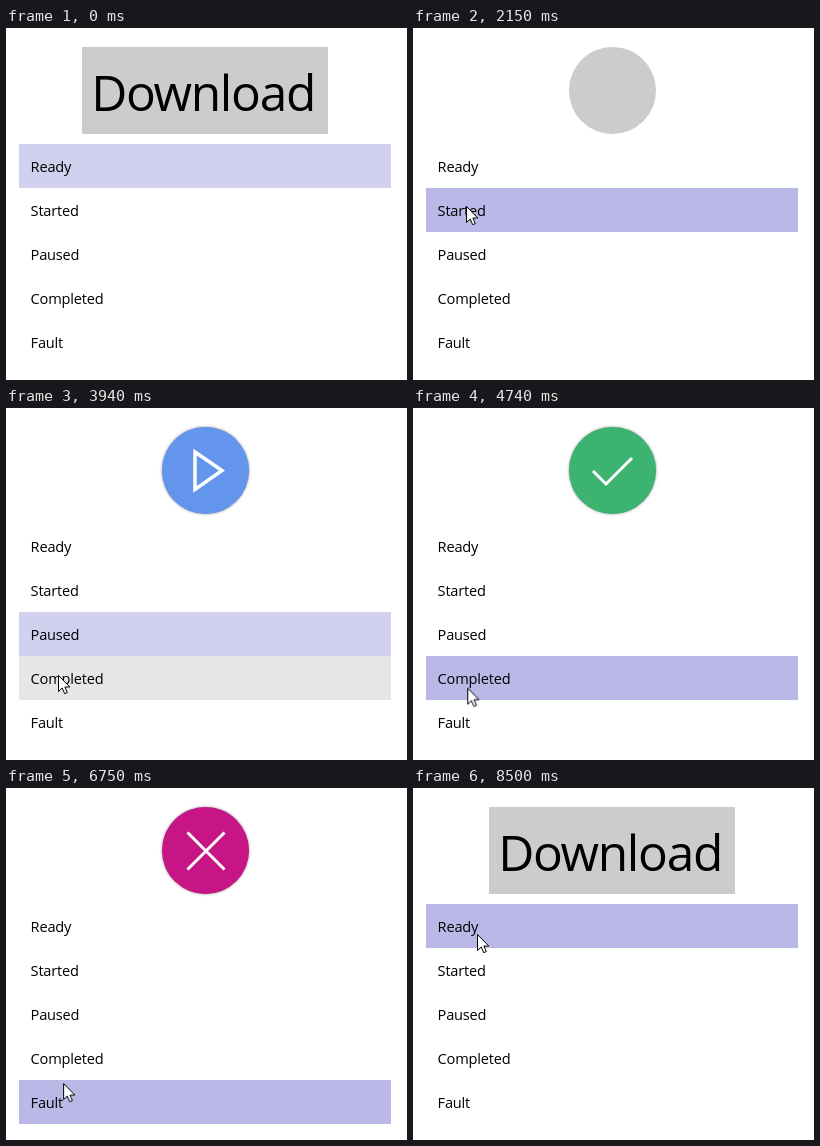
Write an HTML page that moves like this. It is 401 px wide and 352 px high and loops after 9400 ms.

```html
<!DOCTYPE html>
<html lang="en">
<head>
<meta charset="utf-8">
<title>Download button states</title>
<style>
  html, body { margin: 0; width: 100%; height: 100%; overflow: hidden; background: #fff; }
  svg { display: block; width: 401px; height: 352px; }
  svg * { animation: 9.4s linear infinite; }
  :root { --sel: #d1d0ee; --selHover: #bab8e6; --hover: #e6e6e6; --press: #ccc; }
  text { font-family: "Open Sans", "Noto Sans", sans-serif; }
  .label { font-size: 14.6px; letter-spacing: -.2px; }
  .caption { font-size: 49.5px; letter-spacing: -1.3px; animation-name: caption; }
  .glyph { fill: none; stroke: #fff; }
  .shadow { filter: drop-shadow(0 0 1.5px rgba(0, 0, 0, .4)); }

  /* list rows */
  .row { fill: transparent; animation-timing-function: step-end; }
  .ready { animation-name: ready; }
  .started { animation-name: started; }
  .paused { animation-name: paused; }
  .completed { animation-name: completed; }
  .fault { animation-name: fault; }
  @keyframes ready {
    0% { fill: var(--sel); }
    5.94% { fill: var(--selHover); }
    7.98% { fill: var(--sel); }
    16.48% { fill: transparent; }
    74.99% { fill: var(--hover); }
    78.7% { fill: var(--press); }
    79.04%, 100% { fill: var(--selHover); }
  }
  @keyframes started {
    0% { fill: transparent; }
    7.98% { fill: var(--hover); }
    14.98% { fill: var(--press); }
    16.48% { fill: var(--selHover); }
    26.7% { fill: var(--sel); }
    38.8% { fill: transparent; }
    73.96% { fill: var(--hover); }
    74.99%, 100% { fill: transparent; }
  }
  @keyframes paused {
    0% { fill: transparent; }
    26.7% { fill: var(--hover); }
    38.18% { fill: var(--press); }
    38.8% { fill: var(--selHover); }
    40.4% { fill: var(--sel); }
    43.6% { fill: transparent; }
    72.93% { fill: var(--hover); }
    73.96%, 100% { fill: transparent; }
  }
  @keyframes completed {
    0% { fill: transparent; }
    40.4% { fill: var(--hover); }
    42.97% { fill: var(--press); }
    43.6% { fill: var(--selHover); }
    54.82% { fill: var(--sel); }
    62.86% { fill: transparent; }
    71.88% { fill: var(--hover); }
    72.93%, 100% { fill: transparent; }
  }
  @keyframes fault {
    0% { fill: transparent; }
    54.82% { fill: var(--hover); }
    60.52% { fill: var(--press); }
    62.86% { fill: var(--selHover); }
    71.88% { fill: var(--sel); }
    79.04%, 100% { fill: transparent; }
  }
  .nudge { animation-name: nudge; animation-timing-function: step-end; }
  @keyframes nudge {
    0%, 63.82%, 100% { transform: none; }
    60.52% { transform: translateX(1px); }
  }

  /* button */
  .shape { fill: #ccc; animation-name: shape; }
  @keyframes shape {
    0%, 100% { x: 76px; width: 246px; rx: 0px; }
    16.48% { x: 76px; width: 246px; rx: 0px; animation-timing-function: ease-in-out; }
    22.83% { x: 156px; width: 87px; rx: 43.5px; }
    80% { x: 156px; width: 87px; rx: 43.5px; animation-timing-function: ease-in-out; }
    87.34% { x: 76px; width: 246px; rx: 0px; }
  }
  @keyframes caption {
    0%, 16.48% { opacity: 1; }
    17%, 89.36% { opacity: 0; }
    90.35%, 100% { opacity: 1; }
  }
  .ring { fill: none; stroke: #6495ed; stroke-width: 3; stroke-dasharray: 1; animation-name: ring; }
  @keyframes ring {
    0%, 23.5% { stroke-dashoffset: 1; opacity: 0; }
    23.51% { stroke-dashoffset: 1; opacity: 1; }
    27.02%, 38.8% { stroke-dashoffset: 0; opacity: 1; }
    38.81%, 100% { stroke-dashoffset: 0; opacity: 0; }
  }
  .play { animation-name: play; }
  .done { animation-name: done; }
  .error { animation-name: error; }
  @keyframes play {
    0%, 38.8% { opacity: 0; }
    41.6%, 43.6% { opacity: 1; }
    43.61%, 100% { opacity: 0; }
  }
  @keyframes done {
    0%, 44.57% { opacity: 0; }
    48.08%, 62.85% { opacity: 1; }
    62.86%, 100% { opacity: 0; }
  }
  @keyframes error {
    0%, 63.83% { opacity: 0; }
    67.34%, 79.03% { opacity: 1; }
    79.04%, 100% { opacity: 0; }
  }

  /* pointer */
  .pointer { animation-name: move; }
  .arrow { fill: #fff; stroke: #000; animation-name: appear; animation-timing-function: step-end; }
  .tap { fill: rgba(70, 115, 224, .7); animation-name: tap; animation-timing-function: step-end; }
  @keyframes move {
    0%, 5% { transform: translate(4px, 135px); }
    10.1%, 16.48% { transform: translate(53px, 177px); }
    18%, 23.94% { transform: translate(53px, 178px); }
    26.49% { transform: translate(53px, 202px); }
    29.79% { transform: translate(52px, 222px); }
    34.26%, 39.15% { transform: translate(52px, 225px); }
    41.49%, 48.3% { transform: translate(52px, 267px); }
    51.17%, 54.15% { transform: translate(55px, 284px); }
    57.02%, 71.28% { transform: translate(56px, 318px); }
    75.32%, 100% { transform: translate(64px, 146px); }
  }
  @keyframes appear {
    0% { opacity: 0; }
    5%, 100% { opacity: 1; }
  }
  @keyframes tap {
    0%, 16.48%, 38.8%, 43.6%, 62.86%, 79.04%, 100% { opacity: 0; }
    14.98%, 38.18%, 42.97%, 60.52%, 78.7% { opacity: 1; }
  }
</style>
</head>
<body>
<svg viewBox="0 0 401 352">
  <rect class="shape" x="76" y="19" width="246" height="87"/>
  <text class="caption" x="85.2" y="83">Download</text>

  <circle class="ring" cx="199.5" cy="62.5" r="42" pathLength="1" transform="rotate(-90 199.5 62.5)"/>
  <g class="play">
    <circle class="shadow" cx="199.5" cy="62.5" r="43.5" fill="#6495ed"/>
    <path class="glyph" stroke-width="3.5" d="M189 44L216 62.5L189 81.5Z"/>
  </g>
  <g class="done">
    <circle class="shadow" cx="199.5" cy="62.5" r="43.5" fill="#3cb371"/>
    <path class="glyph" stroke-width="3" d="M180 63L193 76L219 50"/>
  </g>
  <g class="error">
    <circle class="shadow" cx="199.5" cy="62.5" r="43.5" fill="#c71585"/>
    <path class="glyph" stroke-width="3" d="M181.5 44.5L218.5 81.5M218.5 44.5L181.5 81.5"/>
  </g>

  <rect class="row ready" x="13" y="116" width="372" height="44"/>
  <rect class="row started" x="13" y="160" width="372" height="44"/>
  <rect class="row paused" x="13" y="204" width="372" height="44"/>
  <rect class="row completed" x="13" y="248" width="372" height="44"/>
  <rect class="row fault" x="13" y="292" width="372" height="44"/>
  <text class="label" x="24.6" y="144">Ready</text>
  <text class="label" x="24.6" y="188">Started</text>
  <text class="label" x="24.6" y="232">Paused</text>
  <text class="label" x="24.6" y="276">Completed</text>
  <text class="label nudge" x="24.6" y="320">Fault</text>

  <g class="pointer">
    <circle class="tap" r="12"/>
    <path class="arrow" d="M.5 .5V16.5L4.2 13L6.7 18.7L9.3 17.6L6.9 12H11.8Z"/>
  </g>
</svg>
</body>
</html>
```
